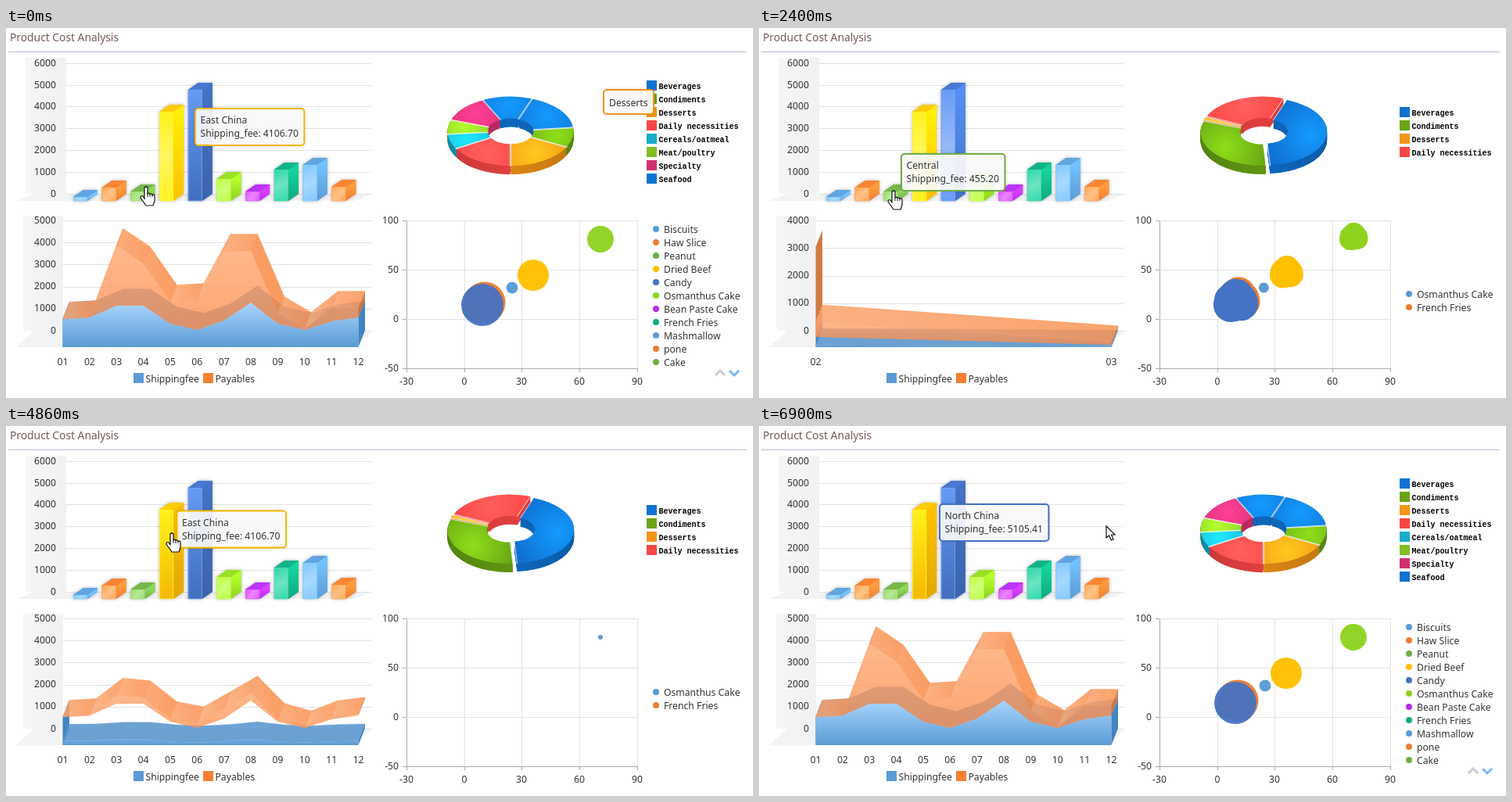
Animation, 955 px wide and 473 px high, one loop 6.96 s. Source, as an HTML page with a canvas:

```html
<!DOCTYPE html>
<html lang="en">
<head>
<meta charset="utf-8">
<title>Product Cost Analysis</title>
<style>
html, body { margin: 0; width: 100%; height: 100%; overflow: hidden; background: #fff; }
canvas { display: block; }
</style>
</head>
<body>
<canvas id="stage" width="955" height="473"></canvas>
<script>
const ctx = document.getElementById('stage').getContext('2d');
const LOOP = 6960, STEP = 60;
const BLUE = '#5b9bd5', ORANGE = '#ed7d31', GREEN = '#70ad47', YELLOW = '#ffc000', NAVY = '#4472c4',
  LIME = '#8fd320', PURPLE = '#b030ee', TEAL = '#11a97f';
const PALETTE = [BLUE, ORANGE, GREEN, YELLOW, NAVY, LIME, PURPLE, TEAL, BLUE, ORANGE, GREEN];
const SANS = '12.2px "Noto Sans", sans-serif';
const MONO = 'bold 10px "Liberation Mono", monospace';

const clamp = v => Math.max(0, Math.min(1, v));
const lerp = (a, b, u) => a + (b - a) * u;
const easeOut = u => 1 - (1 - u) ** 3;

// ---------- drawing helpers ----------
function text(s, x, y, align = 'left', color = '#333', font = SANS) {
  ctx.font = font;
  ctx.textAlign = align;
  ctx.textBaseline = 'alphabetic';
  ctx.fillStyle = color;
  ctx.fillText(s, x, y + 4.5);
}
function line(x1, y1, x2, y2, color = '#e2e2e2', width = 1) {
  ctx.strokeStyle = color;
  ctx.lineWidth = width;
  ctx.beginPath();
  ctx.moveTo(x1, y1);
  ctx.lineTo(x2, y2);
  ctx.stroke();
}
function poly(points, fill, stroke) {
  ctx.beginPath();
  points.forEach(p => ctx.lineTo(p[0], p[1]));
  ctx.closePath();
  ctx.fillStyle = fill;
  ctx.fill();
  if (stroke) {
    ctx.strokeStyle = stroke;
    ctx.lineWidth = 1.2;
    ctx.lineJoin = 'round';
    ctx.stroke();
  }
}
function disc(x, y, r, color) {
  ctx.fillStyle = color;
  ctx.beginPath();
  ctx.arc(x, y, Math.max(0, r), 0, 7);
  ctx.fill();
}
function square(x, y, color) {
  ctx.fillStyle = color;
  ctx.fillRect(x, y - 7, 13, 13);
}
function paint(gradient, stops) {
  stops.forEach((c, i) => gradient.addColorStop(i / (stops.length - 1), c));
  return gradient;
}
const fade = (x1, y1, x2, y2, ...stops) => paint(ctx.createLinearGradient(x1, y1, x2, y2), stops);
const glow = (x, y, r, ...stops) => paint(ctx.createRadialGradient(x, y, 0, x, y, r), stops);
const channels = hex => [1, 3, 5].map(i => parseInt(hex.slice(i, i + 2), 16));
// mix a hex colour with white (k > 0) or black (k < 0)
function shade(hex, k, alpha = 1) {
  return `rgba(${channels(hex).map(v => Math.round(lerp(v, k > 0 ? 255 : 0, Math.abs(k))))},${alpha})`;
}
function vivid(hex, gain) {
  return '#' + channels(hex).map(v => Math.min(255, Math.round(v * gain)).toString(16).padStart(2, '0')).join('');
}
// interpolate [time, x, y] keys
function follow(keys, t) {
  let i = keys.findIndex(k => k[0] > t);
  if (i < 0) return keys[keys.length - 1].slice(1);
  if (i === 0) return keys[0].slice(1);
  const [a, b] = [keys[i - 1], keys[i]], u = (t - a[0]) / (b[0] - a[0]);
  return [lerp(a[1], b[1], u), lerp(a[2], b[2], u)];
}
function room(left, right, top, floor, front) {
  ctx.fillStyle = fade(left, 0, right, 0, '#f6f6f6', '#f0f1f2');
  ctx.fillRect(left, top, right - left, floor - top);
  poly([[13, front], [36, floor], [468, floor], [446, front]], '#f3f3f3');
}

// ---------- bar chart ----------
const BAR_TOPS = [216, 204, 209, 107, 79, 193, 209, 181, 175, 203];
function drawBars(t) {
  room(25, 77, 38, 212, 221);
  for (let i = 0; i <= 6; i++) {
    const y = 212 - i * 27.9;
    line(77, Math.round(y) + .5, 468, Math.round(y) + .5);
    text(i * 1000, 64, y - .5, 'right');
  }
  BAR_TOPS.forEach((top, i) => {
    const x = 86 + i * 36.7, r = x + 18, dx = 13, dy = -9, c = PALETTE[i], bright = vivid(c, 1.25);
    const solid = i === 3 && t >= 3180 || i === 4 && (t < 600 || t >= 3300);
    ctx.save();
    ctx.shadowColor = 'rgba(0,0,0,.3)';
    ctx.shadowBlur = 4;
    poly([[x, top], [x + dx, top + dy], [r + dx, top + dy], [r + dx, 221 + dy], [r, 221], [x, 221]], c);
    ctx.restore();
    poly([[r, top], [r + dx, top + dy], [r + dx, 221 + dy], [r, 221]],
      fade(0, top, 0, 221, solid ? c : bright, solid ? shade(c, -.12) : c));
    poly([[x, top], [x + dx, top + dy], [r + dx, top + dy], [r, top]], vivid(c, 1.06));
    poly([[x, top], [r, top], [r, 221], [x, 221]], solid
      ? fade(x, top, r, 221, shade(bright, .1), shade(c, -.04))
      : fade(x, top, r, 221, shade(bright, .1), shade(bright, .38), shade(bright, .12)));
    ctx.strokeStyle = shade(bright, .2, .8);
    ctx.lineWidth = 1;
    ctx.strokeRect(x + .5, top + .5, 17, 220.5 - top);
  });
}

// ---------- stacked area chart ----------
const YEAR = {
  max: 5, first: 1,
  layers: [[36, 38, 53, 53, 30, 22, 34, 57, 30, 22, 33, 38], [0, 0, 77, 54, 28, 38, 89, 66, 13, 1, 17, 12]]
};
const DETAIL = { max: 4, first: 2, layers: [[13, 3], [115, 16]] };
function drawArea(data, grow) {
  const base = 408, dx = 8.5, dy = -21.5, n = data.layers[0].length;
  const xs = data.layers[0].map((_, i) => 72.5 + i * 378 / (n - 1));
  room(22, 73, 240, 387, base);
  for (let i = 0; i <= data.max; i++) {
    const y = 387 - i * 141 / data.max;
    line(73, Math.round(y) + .5, 468, Math.round(y) + .5);
    text(i * 1000, 64, y - 1, 'right');
  }
  xs.forEach((x, i) => text(String(i + data.first).padStart(2, '0'), x, 426, 'center'));

  const back = ([x, y]) => [x + dx, y + dy];
  let floor = xs.map(x => [x, base]);
  data.layers.forEach((values, k) => {
    const color = k ? '#f9843c' : '#4f8fca';
    const top = floor.map(([x, y], i) => [x, y - values[i] * grow]);
    const full = floor.map(([x, y], i) => [x, y - values[i]]);
    const wall = (i, line, c) => poly([floor[i], line[i], back(line[i]), back(floor[i])], c);
    wall(0, full, k ? '#d27a47' : '#4385c1');
    for (let i = 0; i < n - 1; i++) {
      const slope = (top[i + 1][1] - top[i][1]) / (xs[i + 1] - xs[i]);
      const tone = k ? clamp(.26 - slope * .08) : .03;
      const a = top[i], b = top[i + 1];
      poly([a, back(a), back(b), b], fade(a[0], 0, b[0], 0, shade(color, tone, .85), shade(color, tone * .5, .85)),
        shade(color, .12, .35));
    }
    const high = Math.min(...top.map(p => p[1]));
    poly([...top, ...floor.slice().reverse()], k
      ? fade(0, high, 0, base, 'rgba(255,166,110,.8)', 'rgba(252,134,66,.76)')
      : fade(0, Math.min(high, 380), 0, base, '#a9d5fc', BLUE));
    wall(n - 1, top, k ? 'rgba(210,113,60,.9)' : '#4385c1');
    floor = full;
  });
  square(163, 448, BLUE);
  text('Shippingfee', 178.5, 448);
  square(252, 448, '#f58030');
  text('Payables', 267.5, 448);
}

// ---------- donut ----------
const DISHES = ['Beverages', 'Condiments', 'Desserts', 'Daily necessities', 'Cereals/oatmeal', 'Meat/poultry', 'Specialty', 'Seafood'];
const DISH_COLORS = ['#0f72d2', '#69a514', '#f39516', '#fa4646', '#17acc9', '#84bd22', '#d22f6f', '#0f72d2'];
function drawDonut(bounds, gap) {
  const slices = bounds.slice(1).map((end, i) => ({ from: bounds[i], to: end, color: DISH_COLORS[i] }));
  const mid = s => (s.from + s.to) / 2 * Math.PI / 180;
  slices.sort((a, b) => Math.sin(mid(a)) - Math.sin(mid(b)));
  for (const s of slices) {
    const m = mid(s), cx = 645 + Math.cos(m) * gap, cy = 132 + Math.sin(m) * gap * .6;
    const a = s.from * Math.PI / 180, b = s.to * Math.PI / 180;
    const ring = (y, fill) => {
      ctx.beginPath();
      ctx.ellipse(cx, y, 80 - gap * .6, 44 - gap * .4, 0, a, b);
      ctx.ellipse(cx, y, 28, 15.5, 0, b, a, true);
      ctx.closePath();
      ctx.fillStyle = fill;
      ctx.fill();
    };
    const side = fade(565, 0, 725, 0, shade(s.color, -.2), shade(s.color, -.1), shade(s.color, -.2));
    for (let d = 11; d > 0; d -= .5) ring(cy + d, side);
    ring(cy, glow(cx + 58 * Math.cos(m), cy + 32 * Math.sin(m), 55, vivid(s.color, 1.35), s.color));
    for (const e of [a, b]) {
      const c = Math.cos(e), v = Math.sin(e);
      line(cx + 28 * c, cy + 15.5 * v, cx + 80 * c, cy + 44 * v, 'rgba(255,255,255,.8)');
    }
  }
}
function drawPie(all) {
  if (all) drawDonut([-70, -6, 27, 90, 150, 175, 199, 244, 290], 1.4);
  else drawDonut([-70, 86, 199, 204, 290], 3);
  const count = all ? 8 : 4, y0 = all ? 74 : 108;
  for (let i = 0; i < count; i++) {
    square(819, y0 + i * 17, DISH_COLORS[i]);
    text(DISHES[i], 834.5, y0 + i * 17 - .5, 'left', '#000', MONO);
  }
}

// ---------- bubble chart ----------
const SNACKS = ['Biscuits', 'Haw Slice', 'Peanut', 'Dried Beef', 'Candy', 'Osmanthus Cake', 'Bean Paste Cake', 'French Fries', 'Mashmallow', 'pone', 'Cake'];
const BUBBLES = [
  [607, 357, 16, '#cfcfcf'], [598, 360, 14, GREEN], [612, 351, 26.5, ORANGE], [609, 354, 27, NAVY],
  [647, 332, 7.5, BLUE], [674, 316, 20, YELLOW], [760, 270, 17, LIME]
];
// where the dots of one bubble end up, for a bubble of radius 16.5
const SPREAD = [[3, -19], [-16, -1], [11, -1], [19, 0], [22, 11], [-4, 14], [-18, 15]];
function drawBubbles(t) {
  if (t < 2400 || t >= 5820) {
    const size = t < 2400 ? 1 : easeOut(clamp((t - 5760) / 720));
    BUBBLES.slice(1).forEach(([x, y, r, c]) => disc(x, y, r * size, shade(c, 0, c === NAVY ? .93 : .97)));
  } else if (t < 4560) {
    const s = 1 - Math.exp(-(t - 2340) / 270), shrink = 1 - clamp((t - 4140) / 420);
    for (const [x, y, r, c] of BUBBLES) {
      const k = r / 16.5, small = r < 10;
      SPREAD.forEach(([px, py], i) => {
        const last = i === 6;
        if (small && !last) return;
        const dot = small ? 3 : (2.9 + r / 15) * (last ? 1.3 : 1);
        disc(x + px * k * s, y + (py * s - 20 * s * (1 - s)) * k, lerp(r, dot, Math.min(1, s * 1.14)) * shrink, c);
      });
    }
  } else if (t >= 4620 && t < 5040) {
    disc(760, 270, 3 * clamp((t - 4560) / 240), BLUE);
  }
}
function chevron(x, dir, color) {
  ctx.strokeStyle = color;
  ctx.lineWidth = 3;
  ctx.lineJoin = 'miter';
  ctx.beginPath();
  ctx.moveTo(x - 6, 441 - 3 * dir);
  ctx.lineTo(x, 441 + 3 * dir);
  ctx.lineTo(x + 6, 441 - 3 * dir);
  ctx.stroke();
}
function drawScatter(t) {
  for (let i = 0; i < 5; i++) {
    const x = Math.round(512 + i * 73.7) + .5;
    line(x, 246, x, 435, i ? '#e2e2e2' : '#aaa');
    line(x, 435, x, 440, '#aaa');
    text(i * 30 - 30, x - .5, 451, 'center');
  }
  for (let i = 0; i < 4; i++) {
    const y = 435.5 - i * 63;
    line(512, y, 807, y, i ? '#e2e2e2' : '#aaa');
    line(507, y, 512, y, '#aaa');
    text(i * 50 - 50, 502, y - 1, 'right');
  }
  drawBubbles(t);
  const all = t < 2400 || t >= 5040;
  (all ? SNACKS : ['Osmanthus Cake', 'French Fries']).forEach((name, i) => {
    const y = (all ? 257 : 340) + i * 17;
    disc(831, y, 4, PALETTE[i]);
    text(name, 841, y);
  });
  if (all) {
    chevron(913, -1, '#ccc');
    chevron(931, 1, '#79b8f5');
  }
}

// ---------- tooltips and pointer ----------
const TIP_PATH = [[0, 241, 102], [60, 241, 102], [240, 196, 148], [480, 181, 160], [3120, 181, 160],
  [3360, 212, 116], [3660, 217.5, 107.5], [6600, 217.5, 107.5], [6840, 230, 99]];
const POINTER_PATH = [[0, 177, 203], [720, 174, 206], [1200, 174, 206], [1380, 170, 208], [2400, 170, 208],
  [2940, 189, 185], [3120, 192, 182], [3600, 210, 137], [6600, 210, 137], [6900, 444, 128]];
function box(x, y, w, h, color) {
  ctx.save();
  ctx.shadowColor = 'rgba(0,0,0,.25)';
  ctx.shadowBlur = 4;
  ctx.fillStyle = 'rgba(255,255,255,.9)';
  ctx.strokeStyle = color;
  ctx.lineWidth = 2;
  ctx.beginPath();
  ctx.roundRect(x + 1, y + 1, w - 2, h - 2, 4);
  ctx.fill();
  ctx.shadowBlur = 0;
  ctx.stroke();
  ctx.restore();
}
function drawTips(t) {
  const [name, fee, color] = t >= 6660 ? ['North China', '5105.41', NAVY]
    : t >= 60 && t < 3180 ? ['Central', '455.20', GREEN] : ['East China', '4106.70', '#f5b800'];
  const [x, y] = follow(TIP_PATH, t), label = 'Shipping_fee: ' + fee;
  ctx.font = SANS;
  box(x, y, ctx.measureText(label).width + 16, 49, color);
  text(name, x + 7.5, y + 15.5);
  text(label, x + 7.5, y + 32.5);
  const alpha = 1 - clamp(t / 420);
  if (alpha > 0) {
    ctx.globalAlpha = alpha;
    box(763, 78, 66, 33, '#f39516');
    text('Desserts', 771, 95);
    ctx.globalAlpha = 1;
  }
}
const HAND = new Path2D('M0 1Q2-1 4 1V9Q6 7 7 9.500Q9 8 10 10.500Q13 9 13 12V18L11 24H2L-5 14Q-5 11-2 12L0 15Z');
const ARROW = new Path2D('M0 0V15L3.500 12L6.500 18L9 17L6.500 11H11Z');
function drawPointer(t) {
  const [x, y] = follow(POINTER_PATH, t);
  ctx.save();
  ctx.translate(x, y);
  const shape = x > 265 ? ARROW : HAND;
  ctx.fillStyle = '#fff';
  ctx.strokeStyle = '#111';
  ctx.lineWidth = 1.2;
  ctx.fill(shape);
  ctx.stroke(shape);
  if (shape === HAND) [4, 7, 10].forEach(fx => line(fx, 9, fx, 13, '#111'));
  ctx.restore();
}

function draw(t) {
  ctx.fillStyle = '#fff';
  ctx.fillRect(0, 0, 955, 473);
  text('Product Cost Analysis', 5, 12.5, 'left', '#735a56', '13.8px "Noto Sans", sans-serif');
  line(3, 30.5, 947, 30.5, '#b5bdd3');
  drawBars(t);
  if (t >= 2040 && t < 4620) {
    drawArea(DETAIL, t < 2400 ? 0 : 1 - (1 - clamp((t - 2190) / 2380)) ** 2);
  } else {
    const held = t >= 4860 && t < 5040 ? 4860 : t;
    drawArea(YEAR, t < 2040 ? 1 : .5 - .5 * Math.cos(Math.PI * clamp((held - 4620) / 960)));
  }
  drawPie(t < 2400 || t >= 5700);
  drawScatter(t);
  drawTips(t);
  drawPointer(t);
}

function tick() {
  draw(Math.floor(performance.now() % LOOP / STEP) * STEP);
  requestAnimationFrame(tick);
}
tick();
</script>
</body>
</html>
```
